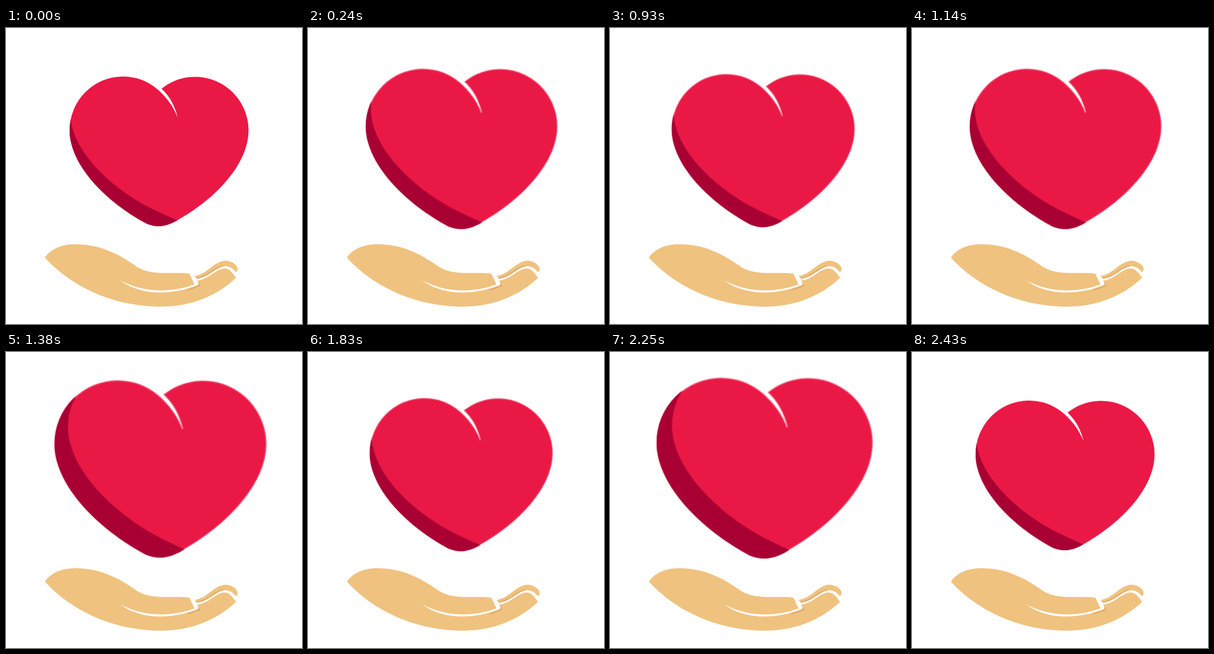
Recreate the animation shown at these times as an HTML page. Size 512 by 512 pixels, loop 2.7 s.

```html
<!DOCTYPE html>
<html lang="en">
<head>
<meta charset="utf-8">
<title>Heart in hand</title>
<style>
  html, body { margin: 0; width: 100%; height: 100%; overflow: hidden; background: #fff; }
  svg { display: block; width: 100vw; height: 100vh; }

  /* Two beats, then a rest. */
  .heart, .shade { animation: beat 900ms cubic-bezier(.33, 0, .67, 1) infinite; }
  .heart { transform-origin: 251.5px 274px; }
  .shade { animation-name: slide; }
  .rim { animation: soften 900ms step-end infinite; }

  @keyframes beat {
    0%, 33.333%, 66.667%, 100% { transform: scale(1); }
    16.667%, 50% { transform: scale(1.208); }
  }
  @keyframes slide {
    0%, 33.333%, 66.667%, 100% { transform: translate(0, 0); }
    16.667%, 50% { transform: translate(21px, 5.5px); }
  }
  /* The lit edge is soft while the heart moves. */
  @keyframes soften {
    0%, 70% { opacity: 0; }
    2% { opacity: .4; }
  }
</style>
</head>
<body>
<svg viewBox="0 0 512 512">
  <defs>
    <path id="outline" d="M110 177A92 93 0 0 1 202 84A93 93 0 0 1 262 106
      C277 119 290 136 297 155C292 134 283 118 269 105
      A92.5 93 0 0 1 419.5 177C419.5 235 363 296 294 334
      C274 345 255 346 237 335C166 295 110 233 110 177Z"/>
    <clipPath id="inside"><use href="#outline"/></clipPath>
  </defs>

  <g class="hand" fill="#f0c27f">
    <path d="M68 396C78 382 96 374 120 374C160 374 192 389 222 410
      C246 429 280 422 314 424.500Q318 425 319 427L331 437C352 434 362 417 378 416
      C388 416 392 425 398 432C362 466 316 482 268 482
      C188 482 115 449 69 399Q67 397.500 68 396Z"/>
    <path d="M326 429C348 426 360 403 380 402.500C391 403 402 411 400.500 418
      Q400 422 397 422C393 416 387 412 378 412C362 414 354 430 331 434Z"/>
    <g fill="none" stroke="#dba467" stroke-width="1.500">
      <path d="M330 433C351 429 360 413.500 376 411.500"/>
      <path d="M314 453Q325 450 335 446L332 439"/>
    </g>
    <path fill="#fff" d="M197 436C238 459 288 458 326 443.500L317.500 425.500L324 426
      L333 441Q333 444 330 445C288 462 233 464 197 436Z"/>
  </g>

  <g class="heart">
    <use href="#outline" fill="#ea1845"/>
    <g clip-path="url(#inside)">
      <use class="rim" href="#outline" fill="none" stroke="#fff" stroke-width="2.500"/>
      <path class="shade" fill="#a90034" d="M203 55A92 92 0 0 0 111 147
        C111 203 167 265 238 305Q265 320 330 347V400H40V55Z"/>
    </g>
  </g>
</svg>
</body>
</html>
```
